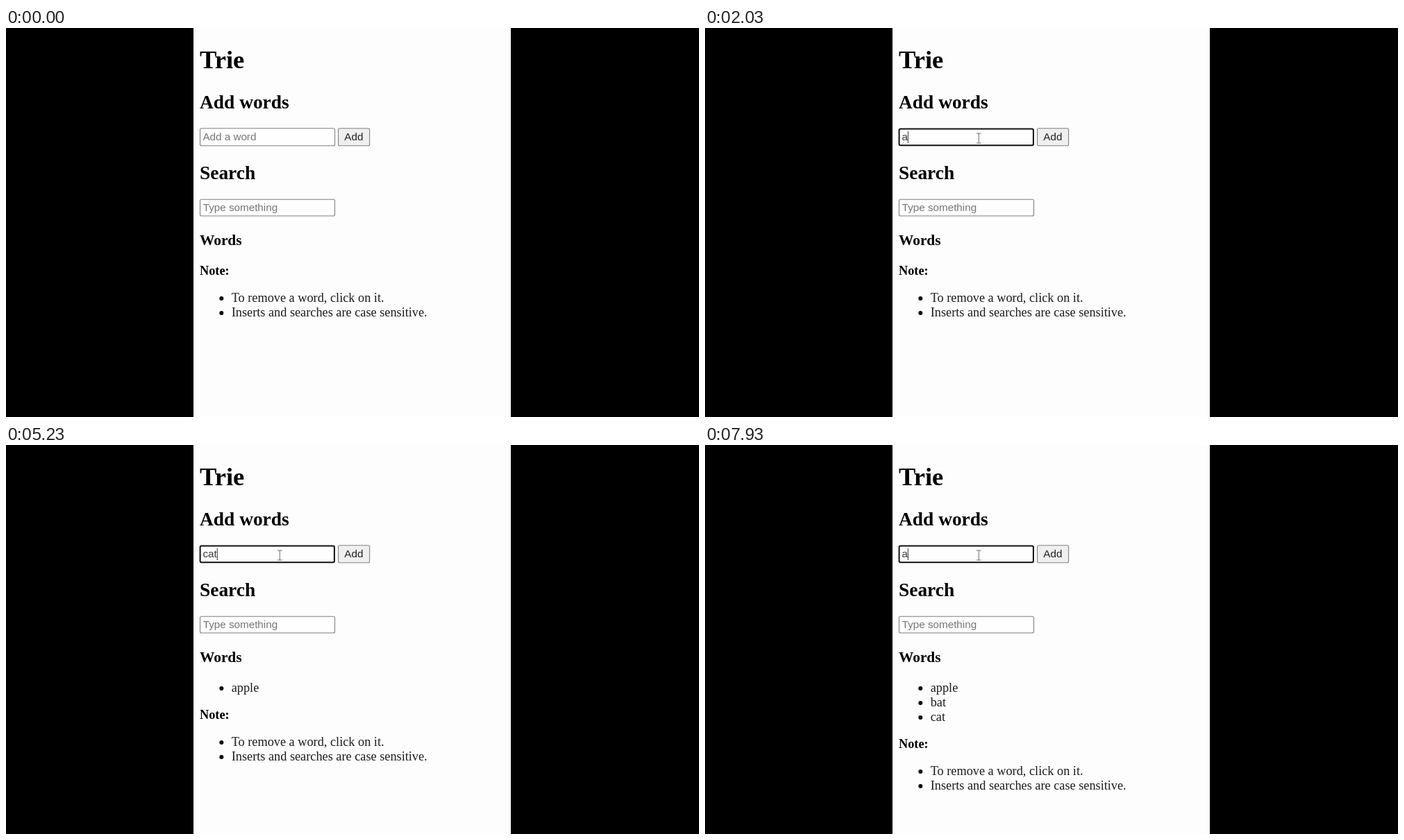
These frames come from a looping animation (998 px wide and 561 px high, 8 s). An HTML page with a canvas:

```html
<!DOCTYPE html>
<html lang="en">
<head>
<meta charset="utf-8">
<title>Trie</title>
<style>
  html, body { margin: 0; width: 100%; height: 100%; overflow: hidden; background: #000; }
  canvas { display: block; }
</style>
</head>
<body>
<canvas width="998" height="561"></canvas>
<script>
const ctx = document.querySelector('canvas').getContext('2d');
const LOOP = 8000;
const SCALE = 457 / 400;
const LEFT = 279, FIELD_X = 283.4, LINE = 21;
const SERIF = '"Liberation Serif", "Times New Roman", serif';
const SANS = '"Liberation Sans", Arial, sans-serif';

// [start time, field text, caret visible]
const typing = [
  [0, '', false], [1170, '', true], [1670, '', false],
  [2030, 'a', true], [2470, 'ap', true], [2630, 'app', true], [2830, 'appl', true],
  [3070, 'apple', true], [3600, 'apple', false],
  [3630, '', false], [4130, '', true], [4630, '', false],
  [4930, 'c', true], [5070, 'ca', true], [5230, 'cat', true],
  [5470, '', true], [5770, '', false], [6300, '', true],
  [6530, 'b', true], [6600, 'ba', true], [6770, 'bat', true], [7300, 'bat', false],
  [7330, '', false], [7830, '', true], [7930, 'a', true]
];
const added = { apple: 3630, bat: 7330, cat: 5470 };
const FOCUS = 1170;
const move = { start: 630, length: 570, from: [367, 264.5], to: [394.3, 159] };

function text(str, x, y, size, { color = '#000', weight = 'normal', family = SERIF } = {}) {
  ctx.font = `${weight} ${size * SCALE}px ${family}`;
  ctx.fillStyle = color;
  ctx.fillText(str, x, y);
}

const heading = (str, y, size) => text(str, LEFT, y, size, { weight: 'bold' });
const control = (str, x, y, color) => text(str, x, y, 13.333, { color, family: SANS });

function listItem(str, y) {
  ctx.fillStyle = '#000';
  ctx.beginPath();
  ctx.arc(310.3, y - 5, 3, 0, 2 * Math.PI);
  ctx.fill();
  text(str, 324.7, y, 16, { color: '#1c1c1c' });
}

function box(x, y, w, h, fill, stroke = '#808080', lineWidth = 1.1) {
  ctx.beginPath();
  ctx.roundRect(x, y, w, h, 2);
  ctx.fillStyle = fill;
  ctx.fill();
  ctx.strokeStyle = stroke;
  ctx.lineWidth = lineWidth;
  ctx.stroke();
}

function addField(t) {
  if (t < FOCUS) box(279.5, 144.7, 194, 25, '#fefefe');
  else box(279.6, 145.6, 193.3, 23.7, '#fefefe', '#101010', 2);

  const [, value, caret] = typing.findLast(([start]) => t >= start);
  control(value || 'Add a word', FIELD_X, 162, value ? '#3a3a3a' : '#757575');
  if (caret) {
    ctx.fillStyle = '#444';
    ctx.fillRect(FIELD_X + ctx.measureText(value).width, 149, 1.1, 17);
  }
}

function pointer(t) {
  if (t < move.start) return;
  const u = Math.min((t - move.start) / move.length, 1);
  const eased = 1 - (1 - u) ** 4;
  const [x, y] = move.from.map((a, i) => a + (move.to[i] - a) * eased);
  const overField = y < 170.5 || y > 247;

  ctx.save();
  ctx.translate(x, y);
  ctx.lineWidth = 1.1;
  if (overField) {
    ctx.strokeStyle = '#777';
    ctx.stroke(new Path2D('M-3.5 -7H-.8L0 -6.4L.8 -7H3.5M0 -6.4V6.4M-3.5 7H-.8L0 6.4L.8 7H3.5'));
  } else {
    const arrow = new Path2D('M.5 .5V15.5L4 12.3L6.4 17.5L8.6 16.5L6.3 11.5H10.8Z');
    ctx.fillStyle = '#fff';
    ctx.fill(arrow);
    ctx.strokeStyle = '#3a3a3a';
    ctx.stroke(arrow);
  }
  ctx.restore();
}

function draw(t) {
  ctx.fillStyle = '#000';
  ctx.fillRect(0, 0, 998, 561);
  ctx.fillStyle = '#fdfdfd';
  ctx.fillRect(270, 0, 457, 561);

  heading('Trie', 57.5, 32);
  heading('Add words', 116, 24);
  addField(t);
  box(478.6, 144.7, 45, 25, '#efefef');
  control('Add', 487.3, 162, '#222');

  heading('Search', 217.5, 24);
  box(279.5, 247.2, 194, 23.8, '#fefefe');
  control('Type something', FIELD_X + 0.3, 264, '#757575');

  heading('Words', 313, 18.72);
  const words = Object.keys(added).filter(word => t >= added[word]);
  words.forEach((word, i) => listItem(word, 356 + i * LINE));

  const noteY = 356 + (words.length && 18 + words.length * LINE);
  heading('Note:', noteY, 16);
  listItem('To remove a word, click on it.', noteY + 39);
  listItem('Inserts and searches are case sensitive.', noteY + 39 + LINE);

  pointer(t);
}

function tick() {
  draw(performance.now() % LOOP);
  requestAnimationFrame(tick);
}
tick();
</script>
</body>
</html>
```
